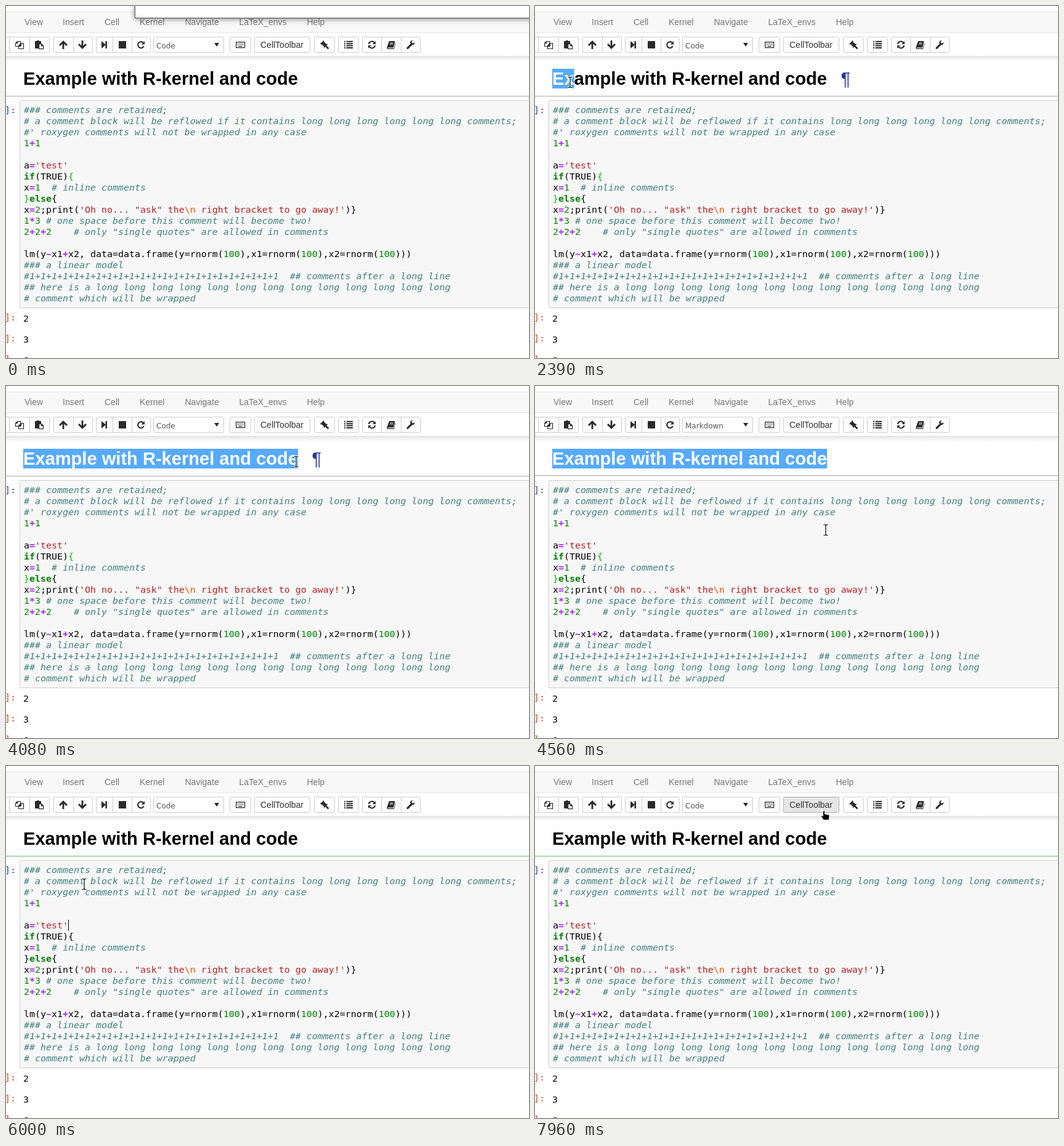
An HTML page that plays this animation: 849 px wide and 572 px high, repeating every 8000 ms.

```html
<!DOCTYPE html>
<html lang="en">
<head>
<meta charset="utf-8">
<title>Notebook</title>
<style>
html, body { margin: 0; width: 849px; height: 572px; overflow: hidden; background: #fff; }
svg { display: block; }
text { white-space: pre; }
.ui { font: 14px "Liberation Sans", Arial, sans-serif; fill: #333; }
.menu text { fill: #777; }
.small { font: 12px "DejaVu Sans", sans-serif; fill: #555; }
.title { font: bold 29.08px "Liberation Sans", Arial, sans-serif; }
.mono { font: 14.95px "DejaVu Sans Mono", monospace; }
.btn { fill: #fff; stroke: #ccc; }
.icon { fill: #2b2b2b; }
.line { fill: none; stroke: #2b2b2b; }
.comment { fill: #408080; font-style: italic; }
.string { fill: #ba2121; }
.esc { fill: #f50; }
.word { fill: #008000; font-weight: bold; }
.num { fill: #080; }
.op { fill: #a2f; font-weight: bold; }
.in { fill: #303f9f; }
.out { fill: #d84315; }
.mark { fill: #56aaff; visibility: hidden; }
.picked .mark { visibility: visible; }
.picked text { fill: #fff; }
</style>
</head>
<body>
<svg id="stage" width="849" height="572" viewBox="0 0 849 572"></svg>
<script>
const stage = document.getElementById('stage');
const title = 'Example with R-kernel and code';
const repeat = (word, n, gap) => Array(n).fill(word).join(gap);

const code = [
  '### comments are retained;',
  `# a comment block will be reflowed if it contains ${repeat('long', 6, ' ')} comments;`,
  "#' roxygen comments will not be wrapped in any case",
  '1+1',
  '',
  "a='test'",
  'if(TRUE){',
  'x=1  # inline comments',
  '}else{',
  "x=2;print('Oh no... \"ask\" the\\n right bracket to go away!')}",
  '1*3 # one space before this comment will become two!',
  '2+2+2    # only "single quotes" are allowed in comments',
  '',
  'lm(y~x1+x2, data=data.frame(y=rnorm(100),x1=rnorm(100),x2=rnorm(100)))',
  '### a linear model',
  `#${repeat('1', 23, '+')}  ## comments after a long line`,
  `## here is a ${repeat('long', 13, ' ')}`,
  '# comment which will be wrapped'
];

const tokens = /(?<comment>#.*)|(?<string>'[^']*')|(?<word>\b(?:if|else)\b)|(?<num>\b\d+)|(?<op>[+*~]|(?<=^\w)=)|(?<pair>(?<=\))\{|^\})/g;
const span = (name, s) => `<tspan class="${name}">${s}</tspan>`;
const paint = line => line.replace(tokens, (s, ...args) => {
  const groups = args[args.length - 1];
  const name = Object.keys(groups).find(k => groups[k] !== undefined);
  return span(name, name === 'string' ? s.replace('\\n', span('esc', '\\n')) : s);
});

const text = (x, y, s, name = '') => `<text x="${x}" y="${y}" class="${name}" xml:space="preserve">${s}</text>`;
const rect = (x, y, w, h, attrs = '') => `<rect x="${x}" y="${y}" width="${w}" height="${h}" ${attrs}/>`;
const icon = (d, extra = '') => `<path class="icon" d="${d}" ${extra}/>`;
const line = (d, w = 1.2, extra = '') => `<path class="line" stroke-width="${w}" d="${d}" ${extra}/>`;

// A group of joined buttons: outer edges with dividers between.
const group = (x1, x2, ...splits) =>
  rect(x1 + .5, 50.5, x2 - x1 - 1, 25, 'rx="2" class="btn"') +
  splits.map(x => `<path d="M${x + .5} 51v24" stroke="#ccc"/>`).join('');

const menu = [[30, 'View'], [92, 'Insert'], [160, 'Cell'], [217, 'Kernel'],
  [290.5, 'Navigate'], [378.5, 'LaTeX_envs'], [488.5, 'Help']];

const arrowUp = 'M93 56l7 7-2 2-3.6-3.5v8.5h-2.8v-8.5L88 65l-2-2z';
const arc = 'M588.8 62A5.2 5.2 0 0 1 598 59.6';

const toolbar =
  group(-30, 71, 5, 38) + group(77, 141, 109) + group(146, 235, 173, 204) +
  group(239, 354) + group(363, 398) +
  rect(403.5, 50.5, 90, 25, 'rx="2" class="btn" id="cellBtn"') +
  group(500, 534) + group(539, 573) + group(578, 673, 609, 641) +
  line('M18.5 57.5h5v8h-8v-5zv3h-3M24.5 60.5h4v9h-8v-5zv4h-4', 1.2) +
  icon('M47 57h3v-1h4v1h3v4h-4v8h-6z') + line('M53.6 61.6h4l3 3v5h-7zM57.6 61.6v3h3') +
  icon(arrowUp) + icon(arrowUp, 'transform="rotate(180 108.5 63)"') +
  icon('M155 57l6.5 5.6V57h2.5v12h-2.5v-5.6L155 69z') +
  icon('M183 57h12v12h-12z') +
  line('M223.7 65.2A5 5 0 1 1 222.4 59.4', 2.1) + icon('M225 57v5.4h-5.4z') +
  line('M373.6 58.6h14v9h-14z') + line('M375.5 61h10.5M375.5 63h10.5', 1.2, 'stroke-dasharray="1.3 1"') + line('M377.5 65.5h6') +
  icon('M511 61.8l5.6-5.6 1.2 1.2-.8.8 4.2 4.2.8-.8 1.2 1.2-5.6 5.6-1.2-1.2.8-.8-4.2-4.2-.8.8z', 'transform="translate(-1 -.3)"') +
  line('M517.5 63.5l6 6', 2.6) +
  [57.8, 61.2, 64.6, 68].map(y => line(`M549 ${y}h2M552.5 ${y}h10.5`, 2)).join('') +
  line(arc, 2) + icon('M600 57v5h-5z') +
  `<g transform="rotate(180 594 63)">${line(arc, 2)}${icon('M600 57v5h-5z')}</g>` +
  icon('M622 57h9.5l-2.6 10.5h-8.6q-1 1 .3 1.2h8.9l2.3-9 .6.6-2.4 9.7h-10.2q-2-.4-1.4-3z') +
  line('M623.5 60h5M623 62h5', .9, 'style="stroke:#fff"') +
  line('M652 68.3l6-6', 3.2, 'stroke-linecap="round"') +
  icon('M663 59.2l-2.6 1.5-1.8-1.2v-2l2.4-1.4c-3-.9-5.3 1.3-5 4l2.8 3.1c3 .4 5.2-1.6 4.2-4z') +
  text(244, 69, 'Code', 'small').replace('<text', '<text id="kind"') +
  icon('M338 60h8l-4 6z') +
  text(413, 68, 'CellToolbar', 'ui');

const result = (value, y) =>
  rect(0, y - 16, 16, 18, 'class="mark"') + rect(28, y - 14, 9, 18, 'class="mark"') +
  text(-2, y - 2, ']:', 'mono out') + text(28, y, value, 'mono');

const beam = 'M-3.5-8.5h2.5l1 1 1-1h2.5M0-7.5v15M-3.5 8.5h2.5l1-1 1 1h2.5';

stage.innerHTML = `
<defs>
  <linearGradient id="fade" x2="0" y2="1"><stop stop-color="#e2e2e2"/><stop offset="1" stop-color="#fff"/></linearGradient>
  <clipPath id="clip">${rect(28, 102, 0, 32, 'id="reach"')}</clipPath>
</defs>
${rect(0, 9, 849, 35, 'fill="#e7e7e7"')}${rect(0, 10, 849, 33, 'fill="#f8f8f8"')}
<g class="ui menu">${menu.map(([x, s]) => text(x, 31, s)).join('')}</g>
${toolbar}
${rect(0, 81, 849, 9, 'fill="url(#fade)"')}
${text(28, 128, title, 'title').replace('<text', '<text id="title"')}
<g clip-path="url(#clip)">${rect(28, 102, 460, 32, 'fill="#56aaff"')}
${text(28, 128, title, 'title').replace('<text', '<text fill="#fff"')}</g>
<g id="pilcrow" fill="#2438a4">${text(496.5, 128, '¶', 'title').replace('<text', '<text style="font-weight:normal"')}</g>
${rect(0, 146, 849, 1, 'id="edge"')}
${rect(22.5, 153.5, 840, 337, 'rx="2" fill="#f7f7f7" stroke="#cfcfcf"')}
${code.map((s, i) => text(29, 174 + 18 * i, paint(s), 'mono')).join('')}
${rect(101, 250, 1, 18, 'id="caret"')}
<g id="rest">
  ${rect(0, 160, 16, 18, 'class="mark"')}${text(-2, 174, ']:', 'mono in')}
  ${result(2, 513)}${result(3, 547)}${result(6, 581)}
</g>
<g id="window">
  ${rect(209, -20, 700, 40, 'fill="#555" style="filter:drop-shadow(0 1px 4px rgba(0,0,0,.5))"')}
  ${rect(210, -20, 700, 39, 'fill="#fff"')}
  ${rect(211, 0, 10, 18, 'fill="#333" id="block"')}
</g>
<g id="cursor">
  <g id="beam" fill="none"><path d="${beam}" stroke="#fff" stroke-width="3"/><path d="${beam}" stroke="#000" stroke-width="1.2"/></g>
  <path id="arrow" d="M0 0v15.5l3.6-3.3 2.6 6 2.6-1.1-2.6-5.8h5z" stroke="#fff" stroke-width=".8"/>
  <path id="hand" d="M-1.5 0h3v5l6 1.2q1.6.5 1.4 2.3l-.9 6.3h-8.5l-4-6 1.2-1.4 1.8 1.2z" stroke="#fff" stroke-width=".8"/>
</g>`;

const $ = id => document.getElementById(id);
const show = (id, on) => $(id).setAttribute('visibility', on ? 'visible' : 'hidden');
const within = (t, a, b) => t >= a && t < b;

// Pointer stops: time, x, y.
const path = [
  [1120, 671, 486], [1560, 86, 190], [1920, 32, 124], [2300, 32, 124], [2910, 455, 126],
  [3180, 478, 150], [3390, 476, 132], [3540, 476, 132], [3700, 472, 127], [3920, 472, 127],
  [4080, 471, 123], [4310, 471, 123], [4640, 472, 253], [4780, 472, 253], [5190, 28, 199],
  [5380, 110, 366], [5550, 210, 270], [5700, 242, 200], [5950, 140, 185], [6150, 60, 230],
  [6360, 58, 279], [6440, 58, 279], [6840, 19, 368], [7160, 80, 440], [7290, 80, 440],
  [7780, 490, 100], [7960, 469, 73], [8000, 469, 73]
];

function pointer(t) {
  const i = Math.max(1, path.findIndex(p => p[0] > t));
  const [a, b] = [path[i - 1], path[i]];
  const k = Math.max(0, (t - a[0]) / (b[0] - a[0]));
  const ease = k * k * (3 - 2 * k);
  return [1, 2].map(n => Math.round(a[n] + (b[n] - a[n]) * ease));
}

// Width of the title up to the letter edge nearest to x.
function reach(x) {
  let best = 0;
  for (let n = 1; n <= title.length; n++) {
    const w = $('title').getSubStringLength(0, n);
    if (Math.abs(28 + w - x) < Math.abs(28 + best - x)) best = w;
  }
  return best;
}

function draw() {
  const t = performance.now() % 8000;
  const [x, y] = pointer(t);
  const titleCell = within(t, 4350, 4780);
  const editing = t >= 4780;
  const hover = editing && y < 77;

  show('window', t < 2140);
  show('block', within(t, 370, 950) || within(t, 1530, 2140));
  $('reach').setAttribute('width', within(t, 2300, 4780) ? reach(x) : 0);
  show('pilcrow', within(t, 1880, 4350) && !within(t, 3580, 3660));
  $('rest').setAttribute('class', within(t, 3100, 4000) ? 'picked' : '');

  $('edge').setAttribute('y', titleCell ? 145 : 146);
  $('edge').setAttribute('fill', editing ? '#66bb6a' : '#ababab');
  $('kind').textContent = titleCell ? 'Markdown' : 'Code';
  document.querySelectorAll('.pair').forEach(p => p.setAttribute('fill', editing ? '#000' : '#0b0'));
  show('caret', within(t, 4780, 7330) && Math.floor((t - 4780) / 510) % 2 === 0);
  $('cellBtn').style.cssText = hover ? 'fill:#e6e6e6;stroke:#adadad' : '';

  const shape = hover ? 'hand' : x < 23 || editing && y < 100 ? 'arrow' : 'beam';
  $('cursor').setAttribute('transform', `translate(${x} ${y})`);
  for (const id of ['beam', 'arrow', 'hand']) show(id, t >= 1120 && id === shape);
  requestAnimationFrame(draw);
}
draw();
</script>
</body>
</html>
```
